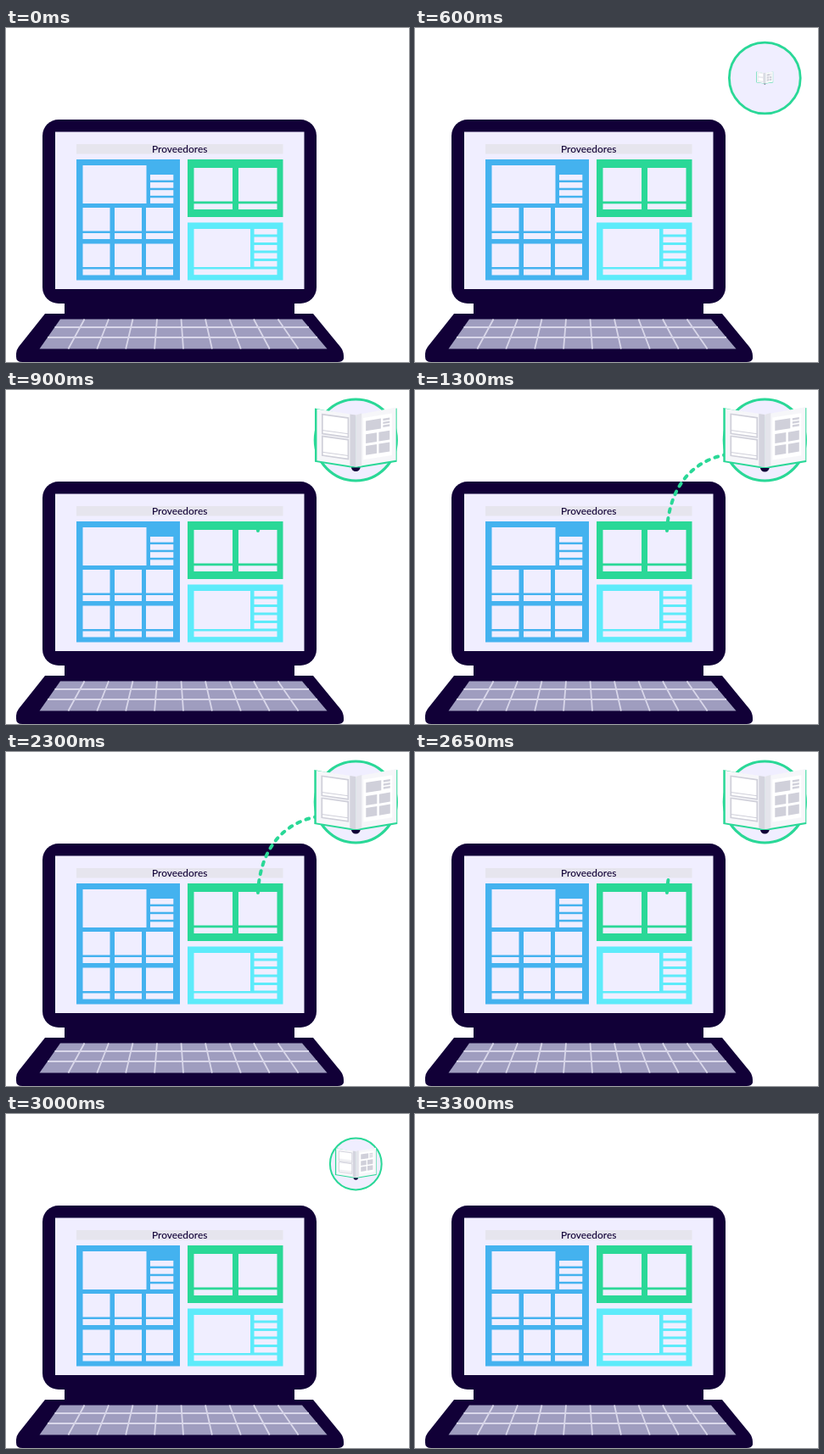
Write an HTML page that moves like this. It is 475 by 394 pixels and loops after 4 s.

```html
<!DOCTYPE html>
<html lang="es">
<head>
<meta charset="utf-8">
<title>Proveedores</title>
<style>
  html, body { margin: 0; width: 100%; height: 100%; overflow: hidden; background: #fff; }
  svg { display: block; width: 100%; height: 100%; }
  text { font: 500 11.9px Lato, sans-serif; fill: #110037; text-anchor: middle; }
</style>
</head>
<body>
<svg viewBox="0 0 475 394">
  <defs>
    <mask id="reveal" maskUnits="userSpaceOnUse" x="280" y="60" width="110" height="120">
      <path id="trail" d="M297 166C299 120 322 84 368 76" pathLength="1"
            fill="none" stroke="#fff" stroke-width="9" stroke-linecap="round"/>
    </mask>
  </defs>

  <g fill="#110037">
    <rect x="43" y="108" width="323" height="217" rx="19"/>
    <rect x="69" y="320" width="271" height="20"/>
    <path d="M46 337H362L394 376Q398 381 398 387V390Q397 394 391 394H19Q12 394 12 388V384Q12 380 15 376Z"/>
  </g>
  <rect x="58" y="122.5" width="293.5" height="185.5" fill="#f0eeff"/>
  <path d="M64 343.5H349L378.5 378.5H39.5Z" fill="#9f9dbf"/>
  <path id="keys" stroke="#d9d7ea" stroke-width="1.8" fill="none"/>

  <rect x="83" y="137" width="243.5" height="11.5" fill="#e6e5ee"/>
  <text x="204.7" y="147">Proveedores</text>
  <g id="panels"></g>

  <path d="M297 166C299 120 322 84 368 76" mask="url(#reveal)" id="link" fill="none"
        stroke="#2ad897" stroke-width="4" stroke-linecap="round" stroke-dasharray="4 7"/>

  <g id="badge">
    <circle r="48" fill="#f0eeff" stroke="#2ad897" stroke-width="3.2"/>
  </g>

  <g id="book">
    <circle cy="32" r="5.5" fill="#110037"/>
    <path d="M-49-38V26L-6 33H6L49 26V-38L0-28Z" fill="#2ad897"/>
    <path d="M-46.5-37L0-30V32L-46.5 24.5Z" fill="#f6f6f9"/>
    <path d="M48-39L0-30V32L48 24Z" fill="#f6f6f9"/>
    <path d="M-7-31L0-30V32L-7 31Z" fill="#d4d4de"/>
    <path d="M0-30L7-32V31L0 32Z" fill="#e4e4eb"/>
    <g transform="skewY(8)" fill="#fff" stroke="#cfcfd9" stroke-width="1.7">
      <rect x="-40" y="-25" width="31" height="23"/>
      <rect x="-40" y="1" width="31" height="23"/>
      <path d="M-40-6H-9M-40 20H-9" stroke-width="1"/>
    </g>
    <g id="print" transform="skewY(-9)" fill="#d0d0da">
      <rect x="9" y="-25" width="34" height="50" fill="#fff"/>
    </g>
  </g>
</svg>

<script>
const el = id => document.getElementById(id);
const box = (x1, y1, x2, y2, fill) =>
  `<rect x="${x1}" y="${y1}" width="${x2 - x1}" height="${y2 - y1}" fill="${fill}"/>`;
const paper = (...b) => box(...b, '#f0eeff');

let keys = 'M57.5 353H357M49 365H367';
for (let i = 1; i < 10; i++) keys += `M${64 + 28.5 * i} 343.5L${39.5 + 33.9 * i} 378.5`;
el('keys').setAttribute('d', keys);

let panels = box(83, 155, 205, 297.5, '#44b2ef') + paper(90.5, 162, 165.5, 207);
for (let i = 0; i < 4; i++) panels += paper(170, 173 + 9.1 * i, 197.3, 179.6 + 9.1 * i);
for (const y of [212, 254.5]) {
  for (const x of [90.5, 128, 165]) {
    panels += paper(x, y, x + 32, y + 27.5) + paper(x, y + 30, x + 32, y + 37);
  }
}
panels += box(214, 155, 326.5, 223, '#2ad897');
for (const x of [221.5, 274]) panels += paper(x, 165, x + 45.5, 204.5) + paper(x, 207.3, x + 45.5, 214);
panels += box(214, 229.5, 326.5, 297.5, '#5debfa');
panels += paper(221.5, 237, 288, 282) + paper(221.5, 284.5, 319.5, 291.2);
for (let i = 0; i < 5; i++) panels += paper(292.5, 237 + 9.5 * i, 319.5, 243.5 + 9.5 * i);
el('panels').innerHTML = panels;

const ink = (...b) => box(...b, '#d0d0da');
let print = ink(12, -21, 30, -9);
for (let i = 0; i < 3; i++) print += ink(32.5, -20.5 + 4 * i, 40.5, -18 + 4 * i);
for (const y of [-5, 9]) print += ink(12, y, 25, y + 11) + ink(27.5, y, 40.5, y + 11);
el('print').innerHTML += print;

function ease(t, start, end) {
  const u = Math.min(1, Math.max(0, (t - start) / (end - start)));
  return u * u * (3 - 2 * u);
}
const inOut = (t, a, b, c, d) => ease(t, a, b) - ease(t, c, d);

function place(id, scale) {
  el(id).setAttribute('transform', `translate(412.3 59) scale(${scale})`);
  el(id).style.display = scale > 0.001 ? '' : 'none';
}

function draw(now) {
  const t = now % 4000;
  place('badge', inOut(t, 360, 670, 2800, 3290));
  place('book', inOut(t, 467, 933, 2767, 3233));
  const length = inOut(t, 867, 1300, 2267, 2760);
  el('trail').setAttribute('stroke-dasharray', `${length} 3`);
  el('link').style.display = length > 0 ? '' : 'none';
  requestAnimationFrame(draw);
}
requestAnimationFrame(draw);
</script>
</body>
</html>
```
